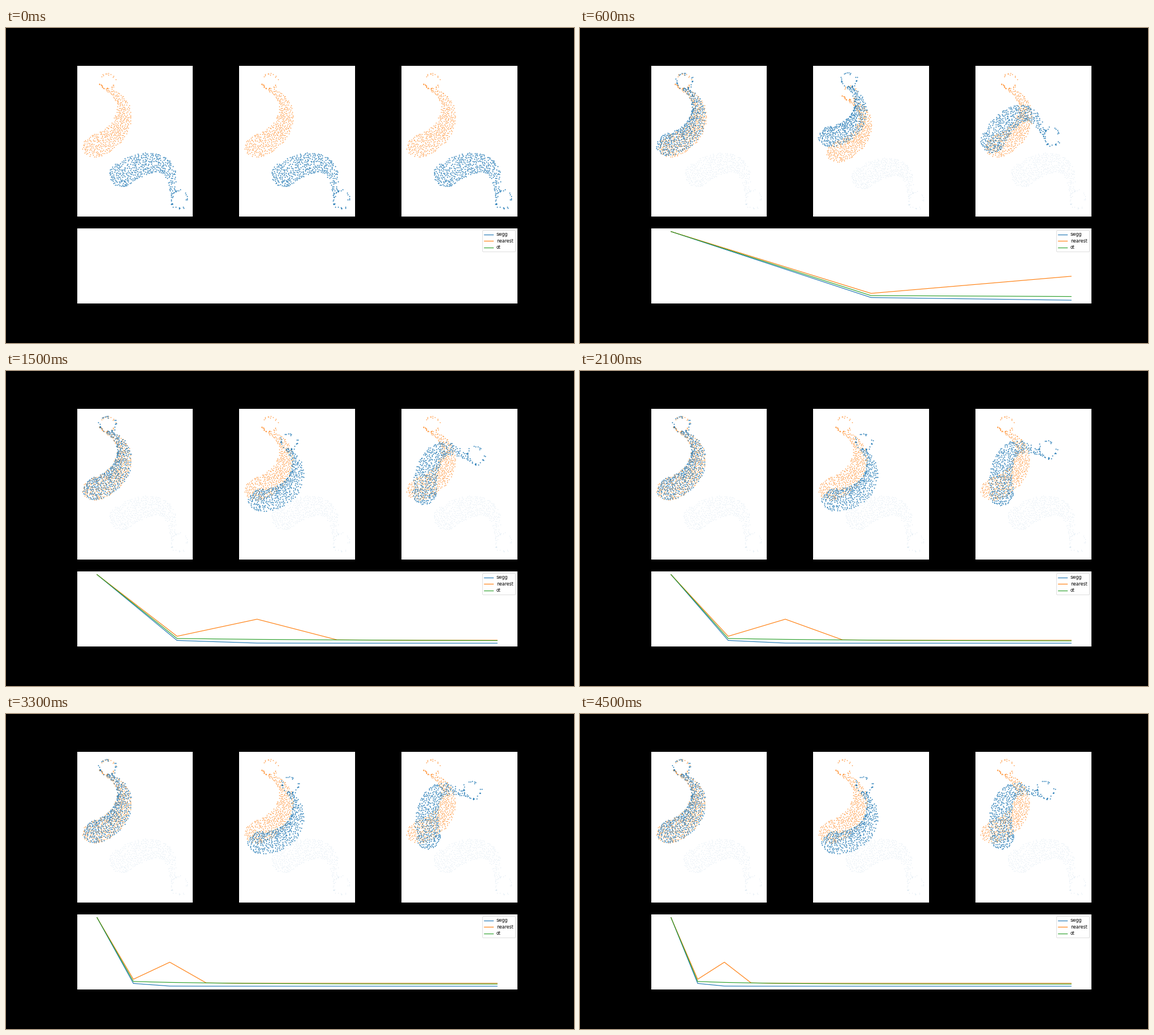
Animation of 1004x558 px, one loop 4.8 s. Source, as a matplotlib script:

```python
import numpy as np
import matplotlib.pyplot as plt
from matplotlib.animation import FuncAnimation

W, H, DPI = 1004, 558, 64
STEPS, INTERVAL = 16, 300
SCALE = 0.775 * 72 / DPI          # keeps point sizes right at this dpi
BLUE, ORANGE, GREEN = "tab:blue", "tab:orange", "tab:green"

plt.rcParams.update({
    "font.family": "DejaVu Sans", "font.size": 10 * SCALE,
    "lines.linewidth": 1.5 * SCALE, "patch.linewidth": SCALE,
})
rng = np.random.default_rng(11)


class Shape:
    """A tapering body along a Bezier curve, ending in a loop (y down)."""

    def __init__(self, curve, girth, loop, loop_size, neck, mid):
        self.curve = np.array(curve, float)
        self.girth, self.neck = girth, neck
        self.loop, self.loop_size = loop, loop_size
        self.mid = np.array(mid, float)

    def body(self, s, t):
        p, s, t = self.curve, s[:, None], t[:, None]
        r = 1 - s
        point = (r**3 * p[0] + 3 * r * r * s * p[1]
                 + 3 * r * s * s * p[2] + s**3 * p[3])
        d = (r * r * (p[1] - p[0]) + 2 * r * s * (p[2] - p[1])
             + s * s * (p[3] - p[2]))
        normal = np.column_stack([-d[:, 1], d[:, 0]])
        normal /= np.linalg.norm(d, axis=1, keepdims=True)
        return point + normal * t * self.girth * half_width(s)

    def ring(self, angle, radius):
        a = self.neck + angle
        circle = np.column_stack([np.cos(a), np.sin(a)]) * radius[:, None]
        return self.loop + circle * self.loop_size

    def points(self, s, t, angle, radius):
        return np.vstack([self.body(s, t), self.ring(angle, radius)])


def half_width(s):
    end = np.clip(s / 0.13, 0, 1)
    return (21.5 - 19 * s * s) * np.sqrt(end * (2 - end))


UPRIGHT = Shape([(135, 211), (205, 212), (235, 130), (177, 108)], 0.95,
                (179, 94), (16.5, 14), np.pi / 2, (185, 175))
ARCH = Shape([(188, 274), (228, 232), (305, 212), (293, 301)], 1.05,
             (305.5, 303.5), (15, 18), np.pi, (248, 250))
BOX = np.array([(135, 79), (321, 322)])
ASPECT = 1.05


def sample(shape, count, ring_count, gap=2.0):
    """Random body and loop parameters; body points keep a small distance."""
    s, t = rng.uniform(0, 1, 4000), rng.uniform(-1, 1, 4000)
    wide = rng.uniform(0, 24, s.size) < half_width(s) + 3
    s, t = s[wide], t[wide]
    pts = shape.body(s, t)
    keep = [0]
    for i, p in enumerate(pts):
        if len(keep) < count and np.hypot(*(pts[keep] - p).T).min() > gap:
            keep.append(i)
    angle = rng.uniform(0, 2 * np.pi, ring_count)
    return s[keep], t[keep], angle, rng.uniform(0.8, 1.03, ring_count)


def turn(pts, mid, deg, to):
    a = np.radians(deg)
    x, y = ((pts - mid) / (1, ASPECT)).T
    return to + np.column_stack([x * np.cos(a) - y * np.sin(a),
                                 (x * np.sin(a) + y * np.cos(a)) * ASPECT])


target = UPRIGHT.points(*sample(UPRIGHT, 420, 32))
params = sample(ARCH, 410, 28)
start, upright = ARCH.points(*params), UPRIGHT.points(*params)


def swgg_pose(k):
    deg = 9 * 0.45 ** (k - 1)
    return turn(upright, UPRIGHT.mid, deg, UPRIGHT.mid + (1 - 0.9 * deg, 0))


def nearest_pose(k):
    """Settles below the goal after one swing past it at the second step."""
    deg = 17.5 - 9.5 * 0.55 ** abs(k - 2)
    swing = 1 - 1.85 * np.exp(-2 * (k - 2) ** 2)
    shift = np.array([13.5, 29.5]) * swing
    return turn(upright, UPRIGHT.mid, deg, UPRIGHT.mid + shift)


def ot_pose(k):
    deg = -68 * np.tanh((k / 4.3) ** 1.2)
    return turn(start, ARCH.mid, deg, (184 - 0.2 * k, 170.5))


# Error curves; only their proportions matter, the chart scales itself.
steps = np.arange(STEPS)
errors = np.array([
    121.7 * 0.04 ** steps,
    5.2 + 116.5 * 0.055 ** steps + 37 * np.exp(-4.0 * (steps - 2) ** 2),
    3.7 + 6.6 * 0.68 ** steps + 111.4 * 0.001 ** steps,
])

fig = plt.figure(figsize=(W / DPI, H / DPI), dpi=DPI, facecolor="black")
grid = fig.add_gridspec(2, 3, height_ratios=(2, 1), left=0.125, right=0.9,
                        bottom=0.125, top=0.88, wspace=0.4, hspace=0.1)


def add_axes(cell):
    ax = fig.add_subplot(cell, xticks=[], yticks=[])
    ax.spines[:].set_visible(False)
    return ax


def dots(ax, pts, color, size, alpha=1.0):
    return ax.scatter(*pts.T, s=(size * 72 / DPI) ** 2, c=color,
                      alpha=alpha, linewidths=0)


panels = []
for col, pose in enumerate((swgg_pose, nearest_pose, ot_pose)):
    ax = add_axes(grid[0, col])
    ghost = dots(ax, start, BLUE, 1.4, 0.13)
    dots(ax, target, ORANGE, 1.65, 0.8)
    moving = dots(ax, start, BLUE, 1.9)
    panels.append((ax, pose, ghost, moving))

chart = add_axes(grid[1, :])
lines = [chart.plot([], [], color=c, label=name)[0] for c, name in
         ((BLUE, "swgg"), (ORANGE, "nearest"), (GREEN, "ot"))]
chart.legend(loc="upper right", labelspacing=0.31)


def draw(k):
    for ax, pose, ghost, moving in panels:
        pts = pose(k) if k else start
        moving.set_offsets(pts)
        ghost.set_visible(k > 0)
        low = np.minimum(pts.min(0), BOX[0])
        high = np.maximum(pts.max(0), BOX[1])
        pad = 0.05 * (high - low)
        ax.set_xlim(low[0] - pad[0], high[0] + pad[0])
        ax.set_ylim(high[1] + pad[1], low[1] - pad[1])

    shown = k + 1 if k else 0
    for line, err in zip(lines, errors):
        line.set_data(steps[:shown], err[:shown])
    if k:
        top, bottom = errors[:, :shown].max(), errors[:, :shown].min()
        pad = 0.05 * (top - bottom)
        chart.set_xlim(-0.05 * k, 1.05 * k)
        chart.set_ylim(bottom - pad, top + pad)
    return []


anim = FuncAnimation(fig, draw, frames=STEPS, interval=INTERVAL,
                     init_func=lambda: draw(0), repeat=True, repeat_delay=0)
plt.show()
```
